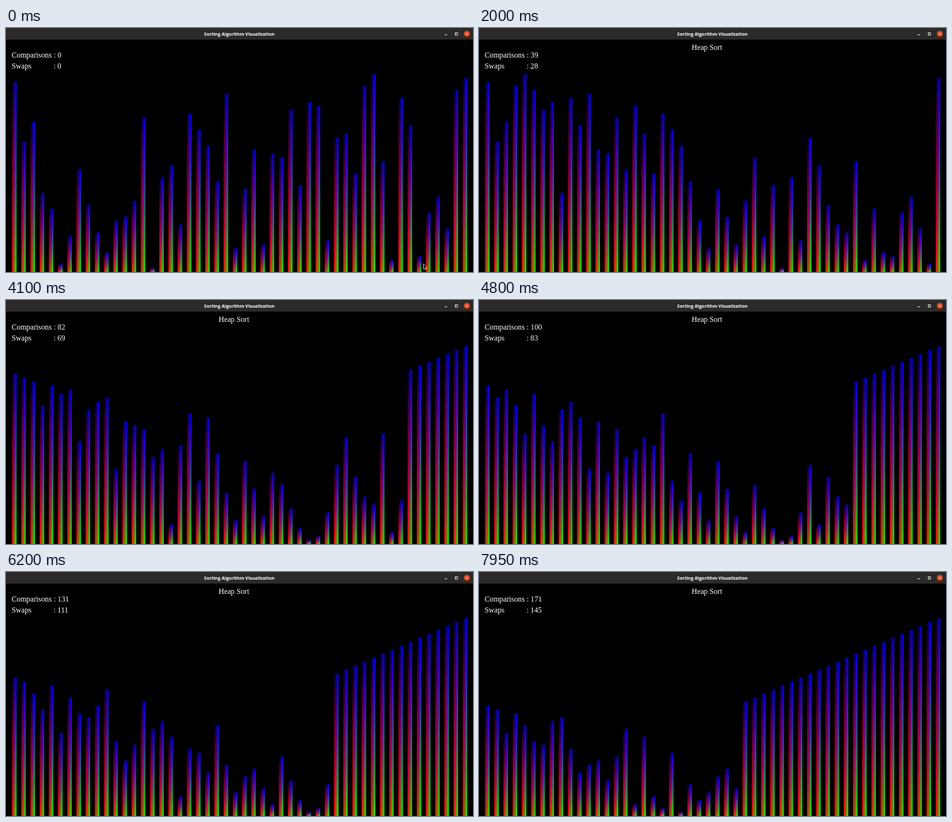
Recreate the animation shown at these times as an HTML page with a canvas. Size 722x379 px, loop 8 s.

```html
<!DOCTYPE html>
<html lang="en">
<head>
<meta charset="utf-8">
<title>Sorting Algorithm Visualization</title>
<style>
  html, body { margin: 0; width: 100%; height: 100%; overflow: hidden; background: #000; }
  canvas { display: block; }
</style>
</head>
<body>
<canvas id="stage" width="722" height="379"></canvas>
<script>
const WIDTH = 722, HEIGHT = 379;
const LOOP = 8000, FRAME = 50;
const SORT_START = 553, SWAP_TIME = 50.85;
const BAR = { left: 9.3, pitch: 14.22, width: 7.1, unit: 6.15 };
const START = [
  48, 33, 38, 20, 16, 2, 9, 26, 17, 10, 5, 13, 14, 18, 39, 1, 24, 27, 12, 40, 36, 32, 23, 45, 6,
  21, 31, 7, 30, 29, 41, 22, 43, 42, 8, 34, 35, 25, 47, 50, 28, 3, 44, 37, 4, 15, 19, 11, 46, 49
];
const ctx = document.getElementById('stage').getContext('2d');

// Runs heap sort and records what is on screen after every swap.
function recordHeapSort(start) {
  const bars = [...start], states = [];
  let comparisons = 0, swaps = 0;

  function swap(a, b) {
    [bars[a], bars[b]] = [bars[b], bars[a]];
    states.push({ bars: [...bars], comparisons, swaps: swaps++ });
  }

  function siftDown(root, size) {
    let largest = root;
    for (const child of [2 * root + 1, 2 * root + 2]) {
      if (child < size && bars[child] > bars[largest]) {
        largest = child;
        comparisons++;
      }
    }
    if (largest !== root) {
      swap(root, largest);
      siftDown(largest, size);
    }
  }

  const last = bars.length - 1;
  for (let i = last >> 1; i >= 0; i--) siftDown(i, last);
  for (let i = last; i > 0; i--) {
    swap(0, i);
    siftDown(0, i);
  }
  return states;
}

const states = recordHeapSort(START);
const idle = { bars: START, comparisons: 0, swaps: 0 };

const rgb = (...parts) => `rgb(${parts.map(p => Math.round(p * 255)).join(',')})`;

// Corners: red and green at the bottom, black and blue at the top,
// blended as two triangles that meet on the rising diagonal.
function drawBar(value, index) {
  const left = BAR.left + index * BAR.pitch, right = left + BAR.width;
  const top = HEIGHT - value * BAR.unit;
  for (let x = Math.floor(left); x < right; x++) {
    const from = Math.max(x, left), to = Math.min(x + 1, right);
    const u = ((from + to) / 2 - left) / BAR.width;
    const gradient = ctx.createLinearGradient(0, HEIGHT, 0, top);
    gradient.addColorStop(0, rgb(1 - u, u, 0));
    gradient.addColorStop(u, rgb(1 - u, 0, u));
    gradient.addColorStop(1, rgb(0, 0, u));
    ctx.globalAlpha = to - from;
    ctx.fillStyle = gradient;
    ctx.fillRect(x, top, 1, HEIGHT - top);
  }
  ctx.globalAlpha = 1;
}

function line(...points) {
  ctx.beginPath();
  for (let i = 0; i < points.length; i += 2) ctx.lineTo(points[i], points[i + 1]);
}

function drawTitleBar() {
  ctx.fillStyle = '#2c2a29';
  ctx.fillRect(0, 0, WIDTH, 18);
  ctx.fillStyle = '#fff';
  ctx.font = 'bold 7px "Open Sans", sans-serif';
  ctx.textAlign = 'center';
  ctx.fillText('Sorting Algorithm Visualization', 360.7, 11.7);
  ctx.textAlign = 'left';

  ctx.strokeStyle = '#e8e8e8';
  ctx.lineWidth = 1;
  line(678, 10.5, 682, 10.5);
  ctx.stroke();
  ctx.strokeRect(694.5, 7.5, 3.5, 3.5);

  ctx.fillStyle = '#e2481f';
  ctx.beginPath();
  ctx.arc(712.5, 9, 4.6, 0, 2 * Math.PI);
  ctx.fill();
  ctx.strokeStyle = '#fff';
  ctx.lineWidth = 0.8;
  line(711, 7.5, 714, 10.5);
  ctx.stroke();
  line(714, 7.5, 711, 10.5);
  ctx.stroke();
}

function drawLabels({ comparisons, swaps }, sorting) {
  ctx.fillStyle = '#fff';
  ctx.font = '11.75px "Liberation Serif", serif';
  ctx.fillText(`Comparisons : ${comparisons}`, 8.7, 46);
  ctx.fillText('Swaps', 8.7, 62.7);
  ctx.fillText(`: ${swaps}`, 73.4, 62.7);
  if (sorting) ctx.fillText('Heap Sort', 328.7, 33.7);
}

function drawCursor() {
  line(645.5, 366, 645.5, 374.5, 647.3, 372.8, 648.6, 375.6, 649.8, 375, 648.6, 372.3, 651, 372.2);
  ctx.closePath();
  ctx.fillStyle = '#000';
  ctx.fill();
  ctx.strokeStyle = '#ddd';
  ctx.lineWidth = 0.8;
  ctx.stroke();
}

function draw(now) {
  const time = Math.floor((now % LOOP) / FRAME) * FRAME;
  const step = Math.floor((time - SORT_START) / SWAP_TIME);
  const sorting = step >= 0;
  const state = sorting ? states[Math.min(step, states.length - 1)] : idle;

  ctx.fillStyle = '#000';
  ctx.fillRect(0, 0, WIDTH, HEIGHT);
  state.bars.forEach(drawBar);
  drawTitleBar();
  drawLabels(state, sorting);
  if (!sorting) drawCursor();
}

const began = performance.now();
function tick() {
  draw(performance.now() - began);
  requestAnimationFrame(tick);
}
tick();
</script>
</body>
</html>
```
